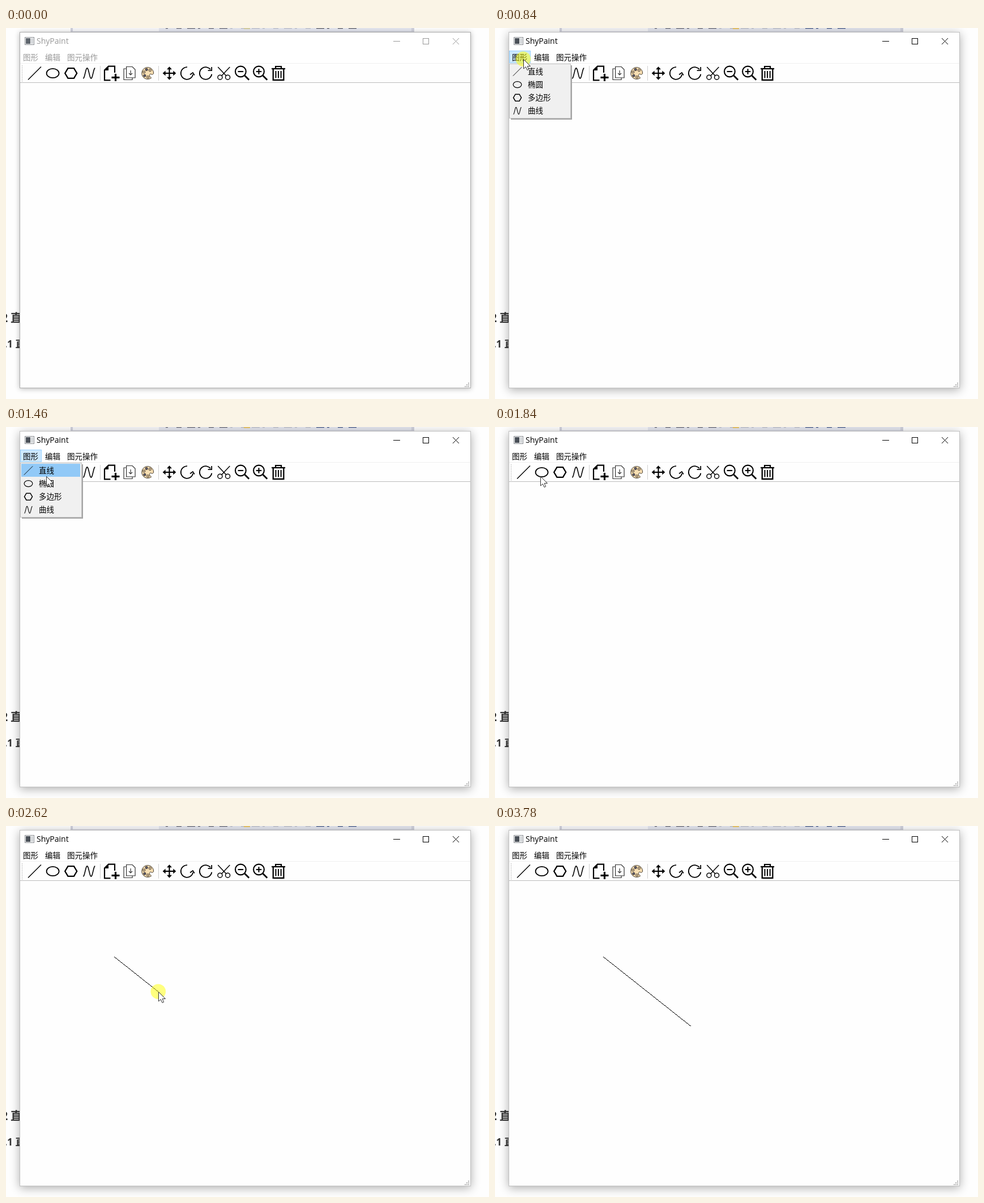
An HTML page with a canvas that plays this animation: 853 px wide and 656 px high, repeating every 4.08 s.

```html
<!DOCTYPE html>
<html lang="zh-CN">
<head>
<meta charset="utf-8">
<title>ShyPaint</title>
<style>
html, body { margin: 0; width: 100%; height: 100%; overflow: hidden; background: #fefefe; }
canvas { display: block; }
</style>
</head>
<body>
<canvas id="stage" width="853" height="656"></canvas>
<script>
const c = document.getElementById('stage').getContext('2d');
const LOOP = 4080;
const STEP = 77;
const TAU = 2 * Math.PI;
const CJK = '"Noto Sans CJK SC", "Noto Sans CJK", "Noto Sans CJK JP", sans-serif';
const LATIN = '"Open Sans", "Noto Sans", sans-serif';
const MENU_FONT = '13.5px ' + CJK;

// ---- drawing helpers ----
const list = (n, f) => Array.from({ length: n }, (_, i) => f(i));

function rect(x, y, w, h, color) {
  c.fillStyle = color;
  c.fillRect(x, y, w, h);
}
function frame(x, y, w, h, color) {
  c.strokeStyle = color;
  c.lineWidth = 1;
  c.strokeRect(x + .5, y + .5, w - 1, h - 1);
}
function trace(pts, close) {
  c.beginPath();
  pts.forEach(([x, y]) => c.lineTo(x, y));
  if (close) c.closePath();
}
function stroke(w, color = '#000') {
  c.lineWidth = w;
  c.strokeStyle = color;
  c.stroke();
}
function line(pts, w, color, close) {
  trace(pts, close);
  stroke(w, color);
}
function fill(pts, color = '#000') {
  trace(pts, true);
  c.fillStyle = color;
  c.fill();
}
function oval(rx, ry, w) {
  c.beginPath();
  c.ellipse(0, 0, rx, ry, 0, 0, TAU);
  stroke(w);
}
function arc(x, y, r, w, a = 0, b = TAU, color = '#000') {
  c.beginPath();
  c.arc(x, y, r, a, b);
  stroke(w, color);
}
function disc(x, y, r, color) {
  c.beginPath();
  c.arc(x, y, r, 0, TAU);
  c.fillStyle = color;
  c.fill();
}
function text(s, x, y, font, color) {
  c.font = font;
  c.fillStyle = color;
  c.fillText(s, x, y);
}
function at(x, y, scale, draw) {
  c.save();
  c.translate(x, y);
  c.scale(scale, scale);
  draw();
  c.restore();
}

// ---- icons, each around its own centre ----
const shapes = [
  () => line([[-11.5, 11.5], [11.5, -11.5]], 1.4),
  () => oval(11, 8.2, 1.8),
  () => line(list(6, i => [10.5 * Math.cos(i * TAU / 6), 10.3 * Math.sin(i * TAU / 6)]), 2.3, '#000', true),
  () => line(list(40, i => {
    const u = i / 39;
    return [21 * u - 10.5, 9.2 * Math.cos(1.5 * TAU * u)];
  }), 1.6)
];

function newPage() {
  line([[-1.5, 12.3], [-12, 12.3], [-12, -5.5], [-5, -12.3], [6, -12.3], [6, -1]], 2.2);
  fill([[-12, -5], [-5, -12], [-5, -5]]);
  line([[.5, 7.5], [14.5, 7.5]], 3.2);
  line([[7.5, 1], [7.5, 14]], 3.2);
}
function copyPage() {
  const ink = '#333';
  line([[-6, -8], [-10, -8], [-10, 11.5], [5, 11.5], [5, 8]], 1.2, ink);
  line([[-5.5, -11.5], [5, -11.5], [10, -6.5], [10, 8], [-5.5, 8]], 1.2, ink, true);
  line([[2, -5], [2, 3]], 1.2, ink);
  line([[-1, 0], [2, 3], [5, 0]], 1.2, ink);
}
function palette() {
  const ink = '#443c30';
  c.beginPath();
  c.arc(0, 0, 10.5, .9, TAU);
  c.quadraticCurveTo(9, 4, 5, 1);
  c.quadraticCurveTo(1, 4, 6.5, 8.2);
  c.fillStyle = '#f8dfb2';
  c.fill();
  stroke(1, ink);
  list(5, i => {
    const a = 1.5 + i * .97;
    const x = 6.8 * Math.cos(a), y = 6.8 * Math.sin(a);
    disc(x, y, 2.2, i % 2 ? '#5a596c' : '#cdb592');
    arc(x, y, 2.2, .9, 0, TAU, ink);
  });
}
function move() {
  list(4, () => {
    line([[0, 0], [8, 0]], 2.2);
    fill([[11.8, 0], [6.8, -4.5], [6.8, 4.5]]);
    c.rotate(TAU / 4);
  });
}
function turnLeft() {
  arc(-1, 0, 10.8, 1.8, .2, 4.75);
  line([[4.5, 2.5], [9.3, -1], [12.3, 3.5]], 1.8);
}
function turnRight() {
  arc(0, 0, 10.8, 1.8, .15, 5.6);
  line([[10.5, -11], [10.5, -4.8], [4, -4.8]], 1.8);
}
function scissors() {
  for (const s of [-1, 1]) {
    line([[s * 10.5, -11], [s * -4, 4.5]], 1.5);
    arc(s * 6.8, 7.2, 4, 1.5);
  }
}
function zoom(plus) {
  arc(-2.5, -3, 9.4, 2.1);
  line([[4, 3.5], [12.3, 11.8]], 2.8);
  line([[-7.3, -3], [2.3, -3]], 2.1);
  if (plus) line([[-2.5, -7.8], [-2.5, 1.8]], 2.1);
}
function trash() {
  line([[-12, -8], [12, -8]], 2.3);
  line([[-5, -8], [-5, -12], [5, -12], [5, -8]], 2.2);
  line([[-9.3, -8], [-9.3, 12], [9.3, 12], [9.3, -8]], 2.3);
  list(3, i => line([[4.6 * i - 4.6, -4], [4.6 * i - 4.6, 8.5]], 2));
}

// ---- scene parts ----
function backdrop(active) {
  rect(0, 0, 853, 656, '#fefefe');
  rect(114, 0, 607, 7, '#d0d1dc');
  rect(118, 0, 152, 6, '#f6f6f9');
  rect(270, 0, 446, 6, '#e3e5ee');
  list(18, i => rect(282 + 19 * i, 0, 4 + 5 * (i % 3), 1.3,
    i < 6 ? '#6a6c78' : i > 13 ? (active ? '#4a5f8c' : '#5d5f68') : '#b9bcc8'));
  rect(420, 0, 11, 2, active ? '#e8c468' : '#d3cda0');

  for (const [label, x, y, size] of [['2', -8.5, 520, 20.5], ['.1', -3, 565, 17.5]]) {
    text(label, x, y, `bold ${size}px ${LATIN}`, '#333');
    text('直', x < -5 ? 8 : 16.5, y, `bold ${size}px ${CJK}`, '#333');
  }
}

function titleBar(active, ink) {
  rect(33, 16, 17, 14, '#8b8f94');
  rect(34, 17, 15, 12, '#f6f6f6');
  rect(35, 18, 8, 10, active ? '#4a5058' : '#5f666e');
  rect(44, 18, 4, 10, '#d2d5d8');
  text('ShyPaint', 54, 28, '14px ' + LATIN, ink);
  rect(684, 23, 12, 1, ink);
  frame(736, 18, 11, 11, ink);
  line([[789, 18], [800, 29]], 1, ink);
  line([[800, 18], [789, 29]], 1, ink);
}

function toolBar(hover) {
  rect(25, 62, 795, 1, '#f0f0f0');
  rect(25, 96, 795, 1, '#bdbdbd');
  for (let y = 66; y < 95; y += 3) rect(28, y, 1, 1.5, '#b0b0b0');
  for (const x of [166, 269]) rect(x, 67, 1, 26, '#d0d0d0');
  if (hover >= 0) rect(35 + 32 * hover, 64, 32, 31, '#e5f3ff');
  const groups = [
    [50.5, shapes],
    [186, [newPage, copyPage, palette]],
    [288.5, [move, turnLeft, turnRight, scissors, () => zoom(false), () => zoom(true), trash]]
  ];
  for (const [x, icons] of groups)
    icons.forEach((icon, i) => at(x + 32.1 * i, 80, 1, icon));
}

function appWindow(active, hover, menuHot) {
  c.save();
  c.shadowColor = active ? 'rgba(0,0,0,.32)' : 'rgba(0,0,0,.28)';
  c.shadowBlur = active ? 16 : 9;
  c.shadowOffsetY = active ? 3 : 1;
  rect(24, 7, 797, 630, '#fefefe');
  c.restore();
  frame(24, 7, 797, 630, active ? '#c0c0c0' : '#acacac');
  rect(25, 8, 795, 55, '#fff');

  const ink = active ? '#000' : '#999';
  titleBar(active, ink);
  if (menuHot) {
    rect(25, 40, 38, 22, '#cce8ff');
    frame(25, 40, 38, 22, '#99d1ff');
  }
  ['图形', '编辑', '图元操作'].forEach((s, i) => text(s, 30 + 39 * i, 57, MENU_FONT, ink));
  toolBar(hover);
  list(3, r => list(r + 1, k => rect(816 - 3 * k, 627 + 3 * r, 2, 2, '#b4b4b4')));
}

function popup(row) {
  rect(28, 66, 108, 96, '#a4a4a4');
  rect(25, 63, 109, 97, '#f0f0f0');
  frame(25, 63, 109, 97, '#c4c4c4');
  if (row >= 0) rect(27, 65 + 23 * row, 104, 23, '#91c9f7');
  ['直线', '椭圆', '多边形', '曲线'].forEach((s, i) => {
    const y = 77 + 23.1 * i;
    at(39.5, y, .67, shapes[i]);
    text(s, 58, y + 5, MENU_FONT, '#000');
  });
}

function pointer() {
  const body = [[.5, .5], [.5, 17], [4.3, 13.6], [7, 19.5], [9.6, 18.4], [7.2, 12.6], [12.5, 12.5]];
  fill(body, '#fff');
  line(body, 1, '#333', true);
}
function resizer() {
  const half = [[-1.5, -8], [-5, -8], [0, -13], [5, -8], [1.5, -8]];
  const body = half.concat(half.map(([a, b]) => [-a, -b]));
  fill(body, '#fff');
  line(body, 1, '#333', true);
}

// One-pixel line without smoothing
function drawnLine([ax, ay], [bx, by]) {
  for (let x = ax; x < bx; x++)
    rect(x, Math.round(ay + (by - ay) * (x - ax) / (bx - ax)), 1, 1, '#000');
}

// ---- motion: start, end, from, to, easing ----
const linear = u => u;
const easeOut = u => 1 - (1 - u) ** 2;
const smooth = u => u * u * (3 - 2 * u);
const A = [191, 231], B = [346, 354], TITLE = [50, 55], ITEM = [71, 75];
const moves = [
  [70, 530, [563, 571], [56, 70], easeOut],
  [610, 760, [55, 67], TITLE, linear],
  [1010, 1230, TITLE, [72, 90], linear],
  [1460, 1610, [71, 87], ITEM, linear],
  [1763, 2230, ITEM, A, smooth],
  [2380, 2850, A, B, smooth],
  [3163, 3700, B, [788, 626], smooth]
];
function pointerAt(t) {
  const m = moves.filter(([start]) => t >= start).pop();
  if (!m || t >= 3780) return null;
  const [start, end, from, to, ease] = m;
  const n = Math.round((end - start) / STEP);
  const k = Math.min(n, Math.floor((t - start) / (end - start) * n + .2));
  return from.map((v, i) => Math.round(v + (to[i] - v) * ease(k / n)));
}
const within = (v, a, b) => v >= a && v < b;

function draw(t) {
  const pos = pointerAt(t);
  const [x, y] = pos || [-99, -99];
  const active = t >= 840;
  const open = within(t, 840, 1840);
  const pressed = within(t, 840, 920) || within(t, 1690, 1840) || within(t, 2380, 2930);
  const overBar = !active && within(x, 35, 163) && within(y, 64, 95);
  const overTitle = within(x, 25, 63) && within(y, 40, 62);

  backdrop(active);
  appWindow(active, overBar ? Math.floor((x - 35) / 32) : -1, open || overTitle);
  if (open) popup(y >= 65 ? Math.floor((y - 65) / 23) : -1);
  if (t >= 2380) drawnLine(A, t < 2930 ? [x, y] : B);
  if (pressed) disc(x - .2, y - .3, 13.3, 'rgba(255,255,0,.5)');
  if (!pos) return;
  if (t >= 3700) at(794.5, 638.5, 1, resizer);
  else at(x, y, 1, pointer);
}

const begin = performance.now();
function tick() {
  draw((performance.now() - begin) % LOOP);
  requestAnimationFrame(tick);
}
tick();
</script>
</body>
</html>
```
